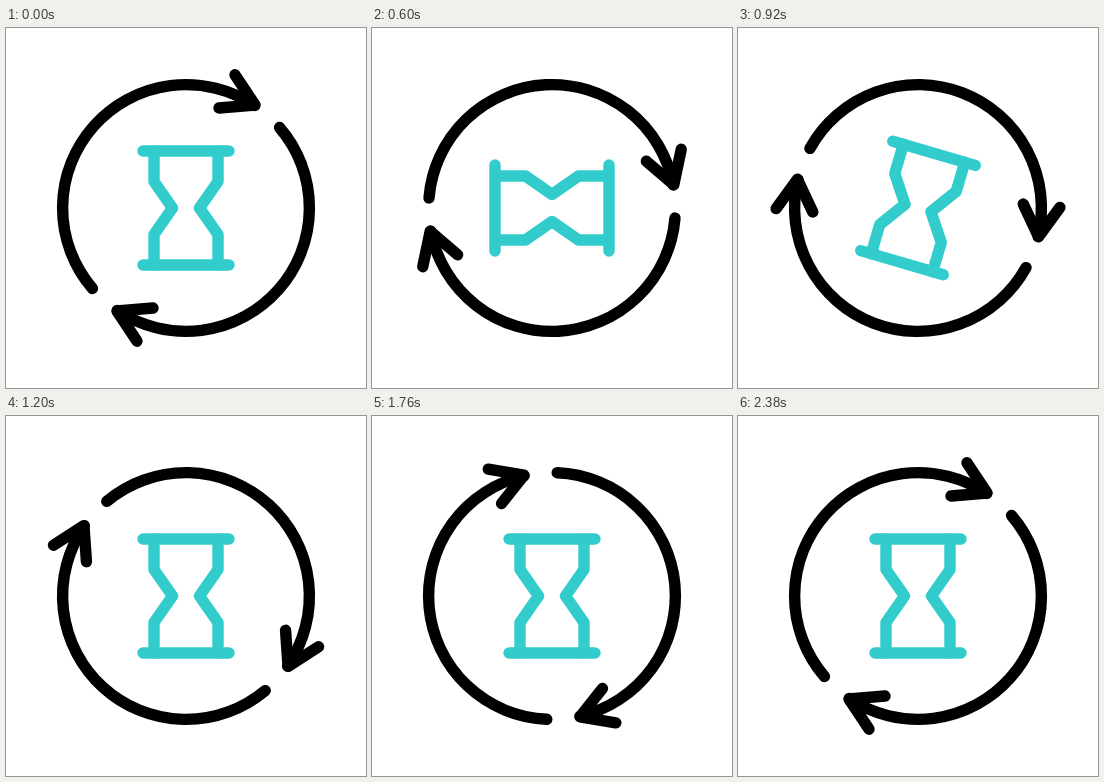
An HTML page for the animation above (2400 ms loop, 360 by 360 pixels).

```html
<!DOCTYPE html>
<html lang="en">
<head>
<meta charset="utf-8">
<title>Hourglass cycle</title>
<style>
  html, body { margin: 0; width: 100%; height: 100%; overflow: hidden; background: #fff; }
  svg { display: block; width: 100vw; height: 100vh; }
  g { fill: none; stroke-width: 11.4; stroke-linecap: round; stroke-linejoin: round; }
</style>
</head>
<body>
<svg viewBox="-180 -180 360 360">
  <g id="ring" stroke="#000"></g>
  <g id="glass" stroke="#33cccc">
    <path d="M-43-57H43M-43 57H43"/>
    <path d="M-32-57V-26.5L-13.5 0L-32 26.5V57"/>
    <path d="M32-57V-26.5L13.5 0L32 26.5V57"/>
  </g>
</svg>
<script>
const LOOP = 2400, STEP = 20, FLIP = 1200, R = 123.4;
const ring = document.getElementById('ring');
const glass = document.getElementById('glass');

const polar = deg => {
  const a = deg * Math.PI / 180;
  return `${(R * Math.cos(a)).toFixed(2)} ${(R * Math.sin(a)).toFixed(2)}`;
};

const arrow = `<path d="M${polar(139.3)}A${R} ${R} 0 0 1 ${polar(-56.2)}"/>
  <path d="M49-133.2L69-103L33-100"/>`;
ring.innerHTML = arrow + `<g transform="rotate(180)">${arrow}</g>`;

// cubic-bezier(.5, 0, .5, 1)
function ease(x) {
  if (x <= 0 || x >= 1) return x <= 0 ? 0 : 1;
  let lo = 0, hi = 1;
  for (let i = 0; i < 30; i++) {
    const s = (lo + hi) / 2;
    if (1.5 * s * (1 - s) + s ** 3 < x) lo = s; else hi = s;
  }
  return lo * lo * (3 - 2 * lo);
}

function draw(now) {
  const t = Math.floor((now % LOOP) / STEP) * STEP;
  ring.setAttribute('transform', `rotate(${180 * t / (LOOP - STEP)})`);
  glass.setAttribute('transform', `rotate(${-180 * ease(t / FLIP)})`);
}

const start = performance.now();
function tick() {
  draw(performance.now() - start);
  requestAnimationFrame(tick);
}
tick();
</script>
</body>
</html>
```
